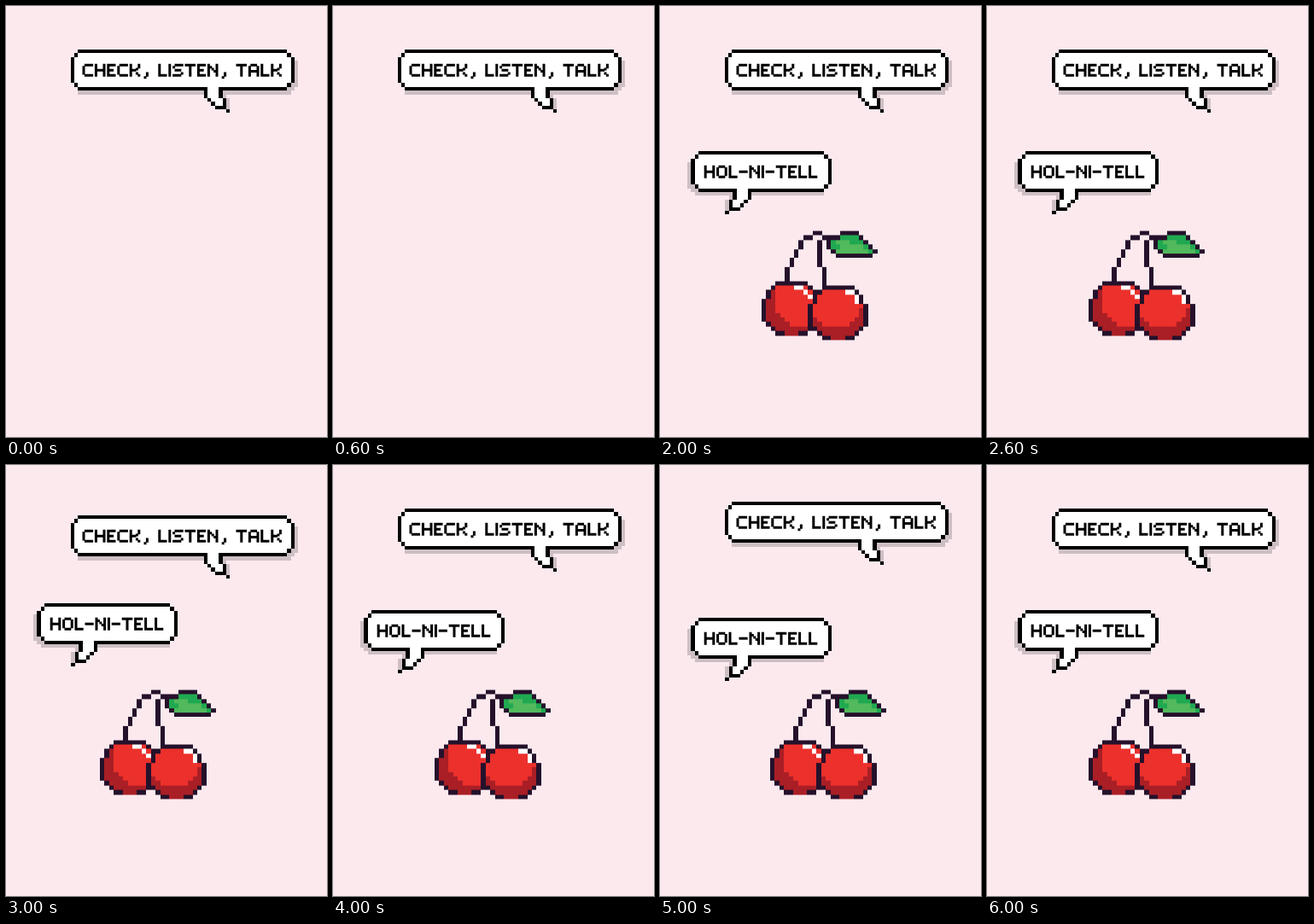
Animation, 376 px wide and 505 px high, one loop 7000 ms. Source, as an HTML page:

```html
<!DOCTYPE html>
<html lang="en">
<head>
<meta charset="utf-8">
<title>Cherries and speech bubbles</title>
<style>
  html, body { margin: 0; width: 100%; height: 100%; overflow: hidden; background: #fce9ee; }
  svg { display: block; width: 376px; height: 505px; }
  path { fill: none; stroke-linecap: square; }
  .pixels { shape-rendering: crispEdges; }
  .glyphs { stroke-width: 1.25; }
  text { font: 20px "Noto Sans Mono", monospace; fill: transparent; }
</style>
</head>
<body>
<svg id="stage" viewBox="0 0 376 505"></svg>
<script>
const INK = '#000', PAPER = '#fff', SHADE = '#cdbfc4';
const OUTLINE = '#25112b', RED = '#ec302c', CRIMSON = '#a91f25';
const GREEN = '#20a951', LIME = '#52b95c';

const stage = document.getElementById('stage');

function add(parent, tag, attrs = {}) {
  const el = document.createElementNS('http://www.w3.org/2000/svg', tag);
  for (const key in attrs) el.setAttribute(key, attrs[key]);
  return parent.appendChild(el);
}

// A one-cell-wide square pen; coordinates name grid cells.
function pen(parent, stroke, d, x = 0, y = 0) {
  add(parent, 'path', { d, stroke, transform: `translate(${x + 0.5} ${y + 0.5})` });
}

// Pixel lettering: glyph width and pen strokes on a six-row grid.
const GLYPHS = {
  A: [5, 'M1 0H3M0 1V5M4 1V5M0 3H4'],
  C: [5, 'M4 0H1M0 1V4M1 5H4'],
  E: [4, 'M0 0V5M0 0H3M0 2.5H2M0 5H3'],
  H: [5, 'M0 0V5M4 0V5M0 2.5H4'],
  I: [1, 'M0 0V5'],
  K: [5, 'M0 0V5M0 2.5H2M3 2h0M4 0V1M3 4h0M4 5h0'],
  L: [4, 'M0 0V5H3'],
  N: [5, 'M0 0V5M4 0V5M1 1h0M2 2h0M3 3h0'],
  O: [5, 'M1 0H3M4 1V4M3 5H1M0 4V1'],
  S: [5, 'M4 0H1M0 1h0M1 2.5H3M4 4h0M0 5H3'],
  T: [5, 'M0 0H4M2 0V5'],
  ',': [3, 'M2 4V5M1 6h0'],
  '-': [4, 'M0 2.5H3'],
  ' ': [3, '']
};

function lettering(parent, str, x, y) {
  const g = add(parent, 'g', {
    class: 'glyphs', 'aria-hidden': true,
    transform: `translate(${x} ${y}) scale(2.4)`
  });
  let col = 0;
  for (const ch of str) {
    const [width, d] = GLYPHS[ch];
    pen(g, INK, d, col);
    col += width + 1;
  }
  // Selectable, readable layer above the pixel letters.
  add(parent, 'text', { x, y: y + 14.5 }).textContent = str;
}

// Rounded panel: each step is one cell narrower and taller.
function panel(g, fill, width, inset, steps, shift = 0) {
  for (let i = 0; i < steps; i++) {
    add(g, 'rect', {
      x: inset + i + shift, y: 2 - i + shift,
      width: width - 2 * (inset + i), height: 7 + 2 * i, fill
    });
  }
}

function bubble({ x, y, width, tail, flip = 1, text, textX }) {
  const root = add(stage, 'g');
  const g = add(root, 'g', {
    class: 'pixels',
    transform: `translate(${x} ${y}) scale(${4.37 * flip} 4.37)`
  });
  panel(g, SHADE, width, 0, 3, 1);
  pen(g, SHADE, 'M2 11h0');
  pen(g, SHADE, 'M5 12h0M6 13V15', tail);
  panel(g, INK, width, 0, 3);
  panel(g, PAPER, width, 1, 2);
  pen(g, INK, 'M0 11V12M1 13h0M2 14h0M3 15H5M6 16h0M4 11V12M5 13V14', tail);
  pen(g, PAPER, 'M1 10H3M1 11H3M1 12H3M2 13H4M3 14H4', tail);
  lettering(root, text, textX, y + 17);
  return root;
}

const inside = (x, y) => Math.hypot(x - 6, y - 5.7) < 6.5;

// Cells near the light point are bright, the rest fall into shade.
function cherry(g, left, top, lightX, lightY, shine) {
  for (let y = 0; y < 12; y++) {
    for (let x = 0; x < 13; x++) {
      if (!inside(x, y)) continue;
      const rim = !(inside(x - 1, y) && inside(x + 1, y) && inside(x, y - 1) && inside(x, y + 1));
      const lit = Math.hypot(x - lightX, y - lightY) < 5.6;
      const fill = rim ? OUTLINE : lit ? RED : CRIMSON;
      add(g, 'rect', { x: left + x, y: top + y, width: 1, height: 1, fill });
    }
  }
  pen(g, PAPER, shine, left, top);
}

function cherries() {
  const root = add(stage, 'g');
  const g = add(root, 'g', { class: 'pixels', transform: 'translate(119 263.4) scale(5.43 5.34)' });
  cherry(g, 0, 11, 7.8, 3.8, 'M7 1H8M9 2h0M10 3h0');
  cherry(g, 10, 12, 5.5, 3.4, 'M8 1H9M10 2V3');
  // Stems
  pen(g, OUTLINE, 'M11 0H12M9 1H10M8 2V3M7 4V5M6 6V7M5 8V10');
  pen(g, OUTLINE, 'M12 2V7M13 8V11M13 1H16');
  // Leaf
  pen(g, OUTLINE, 'M17 0H20M15 1H21M14 2H22M14 3H23M15 4H24M16 5H23');
  pen(g, GREEN, 'M17 1H20M15 2H21M15 3H22M16 4H23');
  pen(g, LIME, 'M16 2H18M17 3H21M16 4H22');
  return root;
}

// One pose per second; parts stay hidden until their entry second.
function play(el, axis, shifts, entry = 0) {
  const n = shifts.length;
  const frames = [...shifts, shifts[n - 1]].map((s, i) => ({
    offset: i / n,
    transform: `translate${axis}(${s}px)`,
    opacity: i < entry ? 0 : 1,
    easing: 'step-end'
  }));
  el.animate(frames, { duration: n * 1000, iterations: Infinity });
}

const slogan = bubble({ x: 75.7, y: 51.1, width: 60, tail: 35.7,
  text: 'CHECK, LISTEN, TALK', textX: 89.8 });
const reply = bubble({ x: 201, y: 170, width: 37.67, tail: 21.5, flip: -1,
  text: 'HOL-NI-TELL', textX: 52 });
const fruit = cherries();

play(slogan, 'Y', [0, 0, 0, 8, 0, -8, 0]);
play(reply, 'Y', [0, 0, 0, -8, 0, 9, 0], 1);
play(fruit, 'X', [0, 0, 0, -9, 0, 10, 0], 2);
</script>
</body>
</html>
```
